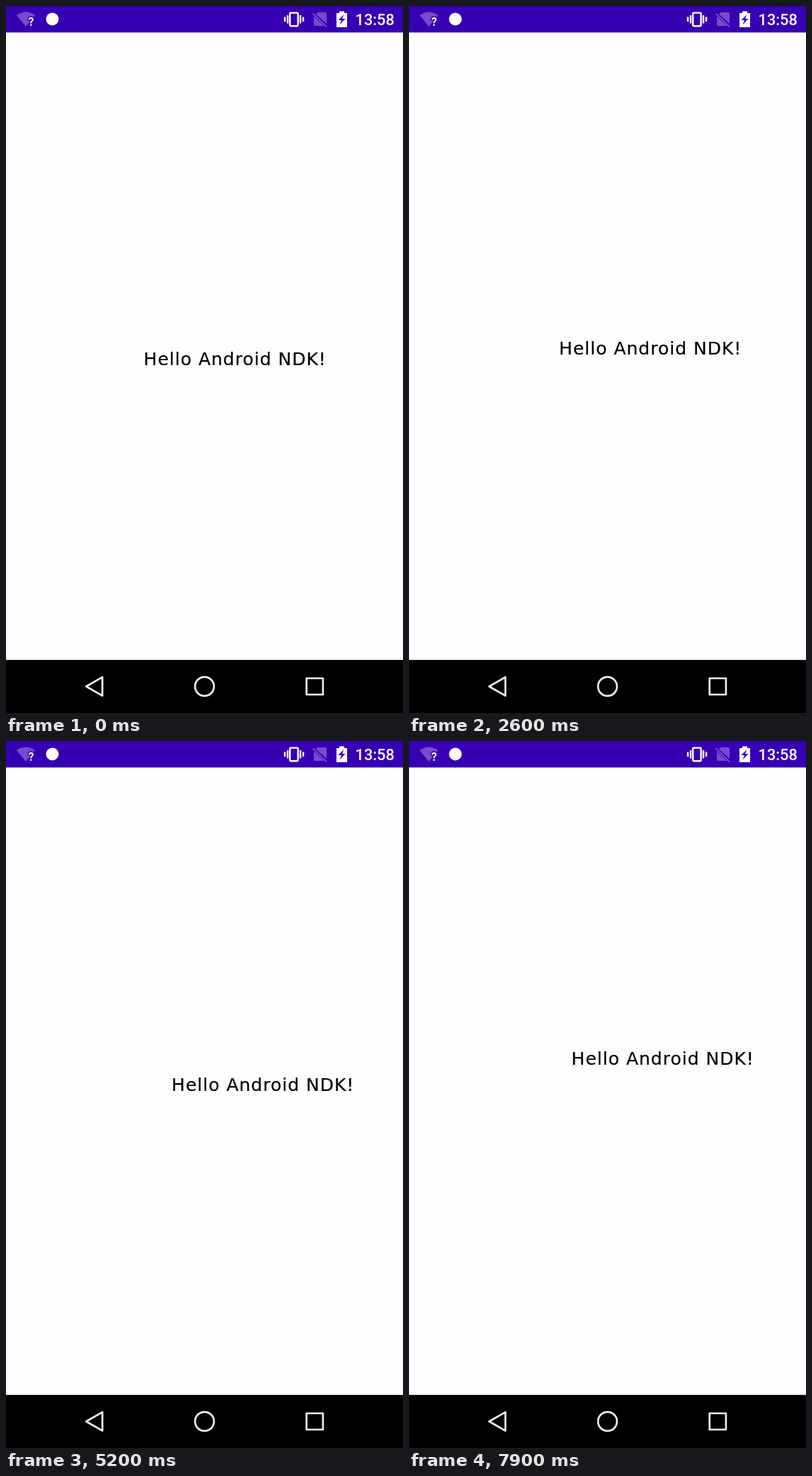
An HTML page for the animation above (8000 ms loop, 561 by 998 pixels).

```html
<!DOCTYPE html>
<html lang="en">
<head>
<meta charset="utf-8">
<title>Moving greeting</title>
<style>
html, body { margin: 0; width: 100%; height: 100%; overflow: hidden; background: #fefcff; }
svg { display: block; width: 100%; height: 100%; }
#hello { font: 25px "DejaVu Sans", sans-serif; letter-spacing: 1px; fill: #000; stroke: #000; stroke-width: .2; }
.clock { font: 500 21.8px Roboto, sans-serif; fill: #fff; }
.query { font: 700 16px Roboto, sans-serif; fill: #fff; stroke: #3700b3; stroke-width: 3; paint-order: stroke; }
</style>
</head>
<body>
<svg viewBox="0 0 561 998">
  <!-- status bar -->
  <rect width="561" height="37.4" fill="#3700b3"/>
  <path d="M15 13Q28 4 41 13L28 29Z" fill="#fff" opacity=".3"/>
  <text class="query" x="31.5" y="27.5">?</text>
  <circle cx="65.5" cy="18.5" r="9" fill="#fff"/>
  <g fill="none" stroke="#fff" stroke-width="2.4">
    <rect x="401.2" y="9.6" width="11.4" height="18.6" rx="1.2"/>
    <path d="M394 15.5V22M398 13V24.5M416 13V24.5M420 15.5V22"/>
  </g>
  <g opacity=".3">
    <path d="M440.5 9H451Q453 9 453 11V25L438 11.5ZM435 14.5L449 28H437Q435 28 435 26Z" fill="#fff"/>
    <path d="M433.5 10.5L453 29.5" stroke="#fff" stroke-width="2"/>
  </g>
  <path d="M471 7.5H478V10H482V30H467V10H471Z" fill="#fff"/>
  <path d="M477.5 12L469.5 20H474L471.5 26.5L479.5 18H475Z" fill="#3700b3"/>
  <text class="clock" x="493.5" y="27">13:58</text>

  <text id="hello">Hello Android NDK!</text>

  <!-- navigation bar -->
  <rect y="923.1" width="561" height="75"/>
  <g fill="none" stroke="#ececec" stroke-width="2.7" stroke-linejoin="round">
    <path d="M113.3 960.5L136.2 947.3V973.7Z"/>
    <circle cx="280.5" cy="960.5" r="13.4"/>
    <rect x="424.7" y="949" width="23.2" height="23"/>
  </g>
</svg>
<script>
const LOOP = 8000, TICK = 100;
// key points of the drift: time, left edge, top of the letters
const keys = [
  [0, 197, 488], [1100, 204, 485], [2200, 210, 467], [2600, 214.5, 473],
  [3300, 213, 474], [3900, 221, 471], [4500, 219, 488], [5300, 239, 473],
  [6000, 243.5, 469], [6900, 232, 461], [7500, 243, 450], [7900, 232, 438]
];
const hello = document.getElementById("hello");

function place(time) {
  const t = Math.floor(time % LOOP / TICK) * TICK;
  const i = Math.max(1, keys.findIndex(key => key[0] >= t));
  const from = keys[i - 1], to = keys[i];
  const k = (t - from[0]) / (to[0] - from[0]);
  const mix = n => from[n] + (to[n] - from[n]) * k;
  hello.setAttribute("x", mix(1) - 2.4);
  hello.setAttribute("y", mix(2) + 19.2);
}

let start;
function frame(now) {
  start ??= now;
  place(now - start);
  requestAnimationFrame(frame);
}
place(0);
requestAnimationFrame(frame);
</script>
</body>
</html>
```
